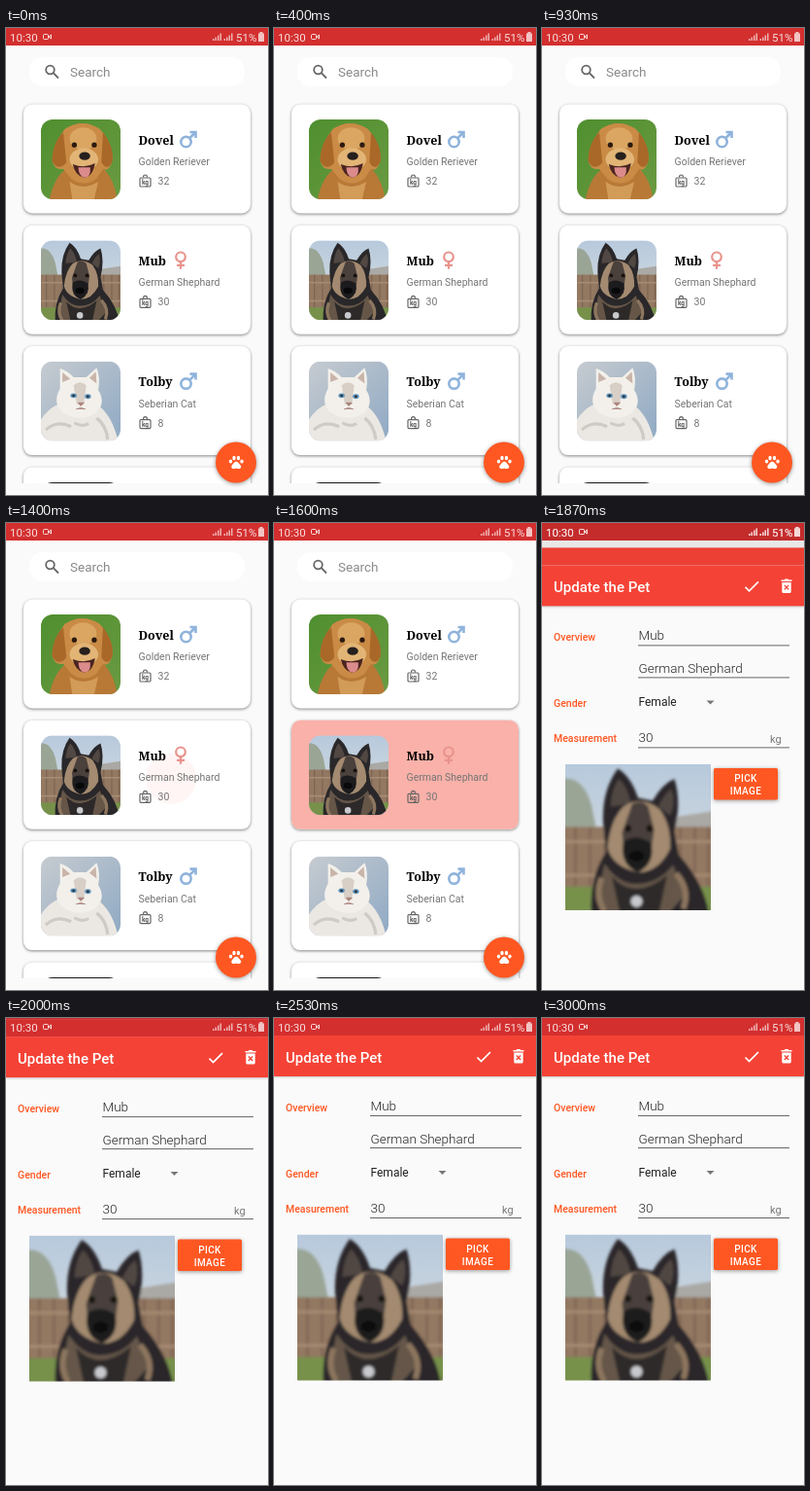
Write an HTML page that moves like this. It is 270 px wide and 480 px high and loops after 3270 ms.

```html
<!DOCTYPE html>
<html lang="en">
<head>
<meta charset="utf-8">
<title>Pet list</title>
<style>
html, body { margin: 0; width: 100%; height: 100%; overflow: hidden; background: #fafafa; }
svg { display: block; }
#stage { width: 270px; height: 480px; font-family: Roboto, sans-serif; }
.name { font: bold 12.5px "Roboto Slab", "Noto Serif", serif; fill: #000; }
.small { font-size: 10.5px; fill: #757575; }
.label { font-size: 10.5px; font-weight: 500; fill: #ff5722; }
.field { font-size: 13.5px; font-weight: 300; fill: #222; }
.pick { font-size: 10px; font-weight: 500; letter-spacing: .4px; fill: #fff; text-anchor: middle; }
.line { stroke: #666; stroke-width: 1; }
.card { fill: #fff; filter: drop-shadow(0 1px 1.5px #0007); }
.raised { fill: #ff5722; filter: drop-shadow(0 1.5px 2px #0006); }
</style>
</head>
<body>
<svg id="stage" viewBox="0 0 270 480">
  <defs>
    <filter id="soft"><feGaussianBlur stdDeviation=".9"/></filter>
    <clipPath id="listClip"><rect y="18" width="270" height="450"/></clipPath>
    <clipPath id="cardClip"><rect x="18" width="234" height="112" rx="9"/></clipPath>
    <clipPath id="photoClip"><rect x="36" y="15.5" width="82" height="82" rx="12"/></clipPath>
    <linearGradient id="sky" x2="0" y2="1"><stop stop-color="#b7c9dc"/><stop offset="1" stop-color="#dde2e2"/></linearGradient>
    <linearGradient id="leaf" x2="1" y2="1"><stop stop-color="#4f8f2f"/><stop offset="1" stop-color="#6a9a42"/></linearGradient>
    <linearGradient id="wall" x2="1" y2="1"><stop stop-color="#c6cbd0"/><stop offset="1" stop-color="#8fa9c4"/></linearGradient>

    <symbol id="golden" viewBox="0 0 100 100">
      <rect width="100" height="100" fill="url(#leaf)"/>
      <g filter="url(#soft)">
        <path d="M10 104Q16 72 32 62L78 60Q94 78 96 104Z" fill="#b87936"/>
        <path d="M30 12Q52 -2 74 12Q86 24 90 48Q88 66 78 62L70 74Q54 86 38 74L28 62Q16 64 14 50Q20 24 30 12Z" fill="#c98b46"/>
        <path d="M28 16Q14 30 14 52Q22 66 32 54ZM78 16Q92 34 90 52Q84 66 76 54Z" fill="#a96828"/>
        <ellipse cx="53" cy="24" rx="17" ry="14" fill="#daa662"/>
        <ellipse cx="54" cy="50" rx="18" ry="14" fill="#e2b576"/>
        <path d="M40 56Q55 62 68 55Q65 72 54 73Q43 70 40 56Z" fill="#4a2420"/>
        <path d="M47 60H62Q63 72 55 73Q47 71 47 60Z" fill="#dc8b8c"/>
        <ellipse cx="55" cy="46" rx="7" ry="5" fill="#26201e"/>
        <circle cx="42" cy="32" r="3.2" fill="#2c1a10"/><circle cx="67" cy="32" r="3.2" fill="#2c1a10"/>
        <path d="M36 78Q53 90 72 78L66 104H40Z" fill="#d29b58"/>
      </g>
    </symbol>

    <symbol id="shepherd" viewBox="0 0 100 100">
      <rect width="100" height="100" fill="url(#sky)"/>
      <g filter="url(#soft)">
        <path d="M-2 10Q12 8 18 28L22 48H-2Z" fill="#9aa596"/>
        <path d="M76 36L102 32V46H76Z" fill="#aaa9a5"/>
        <rect x="-2" y="43" width="104" height="42" fill="#937862"/>
        <path d="M7 43V85M17 43V85M27 43V85M79 43V85M89 43V85M98 43V85" stroke="#745d4c"/>
        <path d="M-2 53H102M-2 76H102" stroke="#a78b73" stroke-width="2"/>
        <rect x="-2" y="84" width="104" height="20" fill="#77914b"/>
        <path d="M18 104Q16 78 28 60L26 40Q25 18 36 3Q45 8 50 23L60 25Q67 13 75 10Q80 26 75 46L78 62Q96 82 99 104Z" fill="#292729"/>
        <path d="M31 29Q32 16 37 10Q43 16 45 27ZM64 29Q69 19 73 17Q76 27 72 35Z" fill="#514743"/>
        <path d="M40 29Q52 21 65 31Q73 42 72 58Q64 74 50 74Q32 70 29 57Q31 38 40 29Z" fill="#a38a70"/>
        <path d="M46 27Q53 24 57 29L61 45L58 66Q50 73 41 65L39 47Z" fill="#4a403c"/>
        <path d="M40 53Q49 47 59 54Q62 68 50 74Q37 69 40 53Z" fill="#1c1b1e"/>
        <path d="M27 68Q36 82 49 82Q64 82 74 69L82 90L70 103H31L22 92Z" fill="#655648"/>
        <path d="M32 77Q48 94 70 76L64 104H38Z" fill="#2d2929"/>
        <path d="M25 78Q20 90 27 101M76 75Q86 86 81 99" fill="none" stroke="#8d765f" stroke-width="4"/>
        <circle cx="43" cy="44" r="2.4" fill="#17120f"/><circle cx="58" cy="44" r="2.4" fill="#17120f"/>
        <ellipse cx="49" cy="63" rx="5.5" ry="4" fill="#09090b"/>
        <circle cx="49" cy="94" r="4" fill="#c7c9ce"/>
      </g>
    </symbol>

    <symbol id="cat" viewBox="0 0 100 100">
      <rect width="100" height="100" fill="url(#wall)"/>
      <g filter="url(#soft)">
        <path d="M-2 104V76Q10 56 28 52L70 54Q90 66 98 104Z" fill="#ebe8e3"/>
        <path d="M24 34L24 9Q34 12 41 20H57L70 8Q75 20 72 36Q82 52 70 64Q50 78 27 64Q14 52 24 34Z" fill="#f3f0eb"/>
        <path d="M27 26L27 14L37 22ZM61 21L69 13L70 28Z" fill="#c9b4aa"/>
        <path d="M41 30Q49 23 57 30L54 54H45Z" fill="#d8cfc7"/>
        <ellipse cx="41" cy="43" rx="4" ry="3" fill="#5c91bb"/><ellipse cx="59" cy="44" rx="4" ry="3" fill="#5c91bb"/>
        <circle cx="41" cy="43" r="1.5" fill="#222"/><circle cx="59" cy="44" r="1.5" fill="#222"/>
        <path d="M47 52H54L50 56ZM44 60Q50 57 56 60" fill="#a9807b" stroke="#a9807b"/>
        <path d="M6 86Q20 73 38 82M42 77Q51 83 60 78M70 71Q82 80 84 98" fill="none" stroke="#cfcac5" stroke-width="4"/>
      </g>
    </symbol>
    <symbol id="dark" viewBox="0 0 100 100"><rect width="100" height="100" fill="#151617"/></symbol>

    <g id="male" fill="none" stroke="#8fb3dc" stroke-width="2.6">
      <circle cx="-2.5" cy="2.5" r="5.2"/><path d="M1.5 -1.5L7.5 -7.5M1.5 -7.5H7.5V-1.5"/>
    </g>
    <g id="female" fill="none" stroke="#e8938c" stroke-width="2.2">
      <circle cy="-3.5" r="4.8"/><path d="M0 1.5V9M-4 5H4"/>
    </g>
    <g id="weight" fill="none" stroke="#666" stroke-width="1.2">
      <rect x="138" y="75.5" width="11" height="9" rx="1"/><path d="M141.5 75Q141.5 72.5 143.5 72.5T145.5 75"/>
      <text x="143.5" y="82.5" font-size="6.5" font-weight="700" text-anchor="middle" fill="#555" stroke="none">kg</text>
    </g>
    <g id="status" fill="#f8dddd" font-size="11.5">
      <text x="4" y="13.5">10:30</text>
      <g fill="none" stroke="#f8dddd"><rect x="38.5" y="6.5" width="5" height="5" rx="1"/><path d="M44 9L46.5 7V11Z"/></g>
      <path id="bars" d="M213 13V11H214.5V13ZM215.5 13V9.5H217V13ZM218 13V7.5H219.5V13ZM220.5 13V5.5H222V13Z" opacity=".75"/>
      <use href="#bars" x="11.5"/>
      <text x="237" y="13.5">51%</text>
      <path d="M260 5.5H261.5V4H264.5V5.5H266V14H260Z" opacity=".85"/>
    </g>
  </defs>

  <g id="listPage">
    <rect width="270" height="480" fill="#fafafa"/>
    <rect x="24" y="30" width="222" height="30" rx="14" fill="#fff"/>
    <g fill="none" stroke="#666" stroke-width="1.8"><circle cx="45.5" cy="43" r="4.3"/><path d="M48.7 46.2L54 51.5"/></g>
    <text x="66" y="50" font-size="13.5" fill="#8a8a8a">Search</text>
    <g id="cards" clip-path="url(#listClip)"></g>
    <circle class="raised" cx="237" cy="446.5" r="21"/>
    <g fill="#fff">
      <ellipse cx="231.5" cy="445.5" rx="1.7" ry="2"/><ellipse cx="235" cy="442" rx="1.7" ry="2.2"/>
      <ellipse cx="239.5" cy="442" rx="1.7" ry="2.2"/><ellipse cx="243" cy="445.5" rx="1.7" ry="2"/>
      <path d="M237.2 445.5Q239 445.5 240.5 448Q243.5 451 241.5 452.5Q240 453.5 237.2 452.5Q234.5 453.5 233 452.5Q231 451 234 448Q235.5 445.5 237.2 445.5Z"/>
    </g>
    <rect width="270" height="18" fill="#d32f2f"/>
    <use href="#status"/>
  </g>
  <rect id="dim" width="270" height="480" opacity="0"/>

  <g id="formPage">
    <rect width="270" height="480" fill="#fafafa"/>
    <rect y="18" width="270" height="42" fill="#f44336" style="filter:drop-shadow(0 1px 1px #0003)"/>
    <rect id="formBar" width="270" height="18"/>
    <text x="12" y="45.5" font-size="15" font-weight="500" fill="#fff">Update the Pet</text>
    <path d="M209.5 40.5L213.5 44.5L223 35" fill="none" stroke="#fff" stroke-width="1.7"/>
    <path d="M246.5 34.5V33H249.5L250.5 32H253.5L254.5 33H257.5V34.5ZM247.3 35.5H256.7V45Q256.7 46.5 255.2 46.5H248.8Q247.3 46.5 247.3 45Z" fill="#fff"/>
    <path d="M249.8 38.5L254.2 43M254.2 38.5L249.8 43" stroke="#f44336" stroke-width="1.4"/>
    <g class="label">
      <text x="12" y="95.5">Overview</text><text x="12" y="163.5">Gender</text><text x="12" y="199.5">Measurement</text>
    </g>
    <g class="field">
      <text x="99.5" y="94.5">Mub</text><text x="99.5" y="128.5">German Shephard</text><text x="99.5" y="199.5">30</text>
    </g>
    <text x="99.5" y="163" font-size="12" fill="#222">Female</text>
    <path d="M169.5 157H177.5L173.5 161Z" fill="#777"/>
    <text x="235" y="201" font-size="11" fill="#777">kg</text>
    <path class="line" d="M99 100.5H255M99 133.5H255M99 205.5H255"/>
    <use href="#shepherd" x="24" y="222.5" width="150" height="150"/>
    <rect class="raised" x="177" y="226.5" width="66" height="32.5" rx="1.5"/>
    <g class="pick"><text x="210" y="241">PICK</text><text x="210" y="253.5">IMAGE</text></g>
  </g>
  <use id="topStatus" href="#status"/>
</svg>

<script>
const LOOP = 3270, PRESS = 1385, OPEN = 1700;
const $ = id => document.getElementById(id);
const clamp = v => v < 0 ? 0 : v > 1 ? 1 : v;

const pets = [
  ["Dovel", "Golden Reriever", 32, "golden", "male", 188],
  ["Mub", "German Shephard", 30, "shepherd", "female", 180],
  ["Tolby", "Seberian Cat", 8, "cat", "male", 188],
  ["", "", "", "dark", "", 0],
];

$("cards").innerHTML = pets.map(([name, breed, kg, photo, sex, sexX], i) => `
  <g transform="translate(0 ${78.5 + i * 124.3})">
    <rect class="card" x="18" width="234" height="112" rx="9"/>
    ${i === 1 ? '<g clip-path="url(#cardClip)"><circle id="ripple" cx="170" cy="60" fill="#f9b1a9"/></g>' : ""}
    <g clip-path="url(#photoClip)"><use href="#${photo}" x="36" y="15.5" width="82" height="82"/></g>
    <text class="name" x="136.5" y="41">${name}</text>
    <use href="#${sex}" x="${sexX}" y="36"/>
    <text class="small" x="136.5" y="62.5">${breed}</text>
    <use href="#weight"/>
    <text class="small" x="156.5" y="82.5">${kg}</text>
  </g>`).join("");

function draw(t) {
  const press = clamp((t - PRESS) / 200);
  const ripple = $("ripple");
  ripple.setAttribute("r", press ? 12 + 175 * press : 0);
  ripple.setAttribute("opacity", clamp(press * 1.6) * (1 - clamp((t - 1670) / 110)));

  // The form fades in while it glides up and slows down.
  const slide = 277 * (1 - clamp((t - OPEN) / 450)) ** 5;
  const alpha = 1 - (1 - clamp((t - OPEN) / 170)) ** 3;
  $("formPage").setAttribute("transform", `translate(0 ${slide})`);
  $("formPage").setAttribute("opacity", alpha);
  $("formBar").setAttribute("fill", slide > 8 ? "#ec4035" : "#d32f2f");
  $("dim").setAttribute("opacity", .07 * clamp((t - OPEN) / 100));
  $("topStatus").setAttribute("opacity", t < OPEN ? 0 : 1);
}

const start = performance.now();
function tick() {
  draw((performance.now() - start) % LOOP);
  requestAnimationFrame(tick);
}
tick();
</script>
</body>
</html>
```
